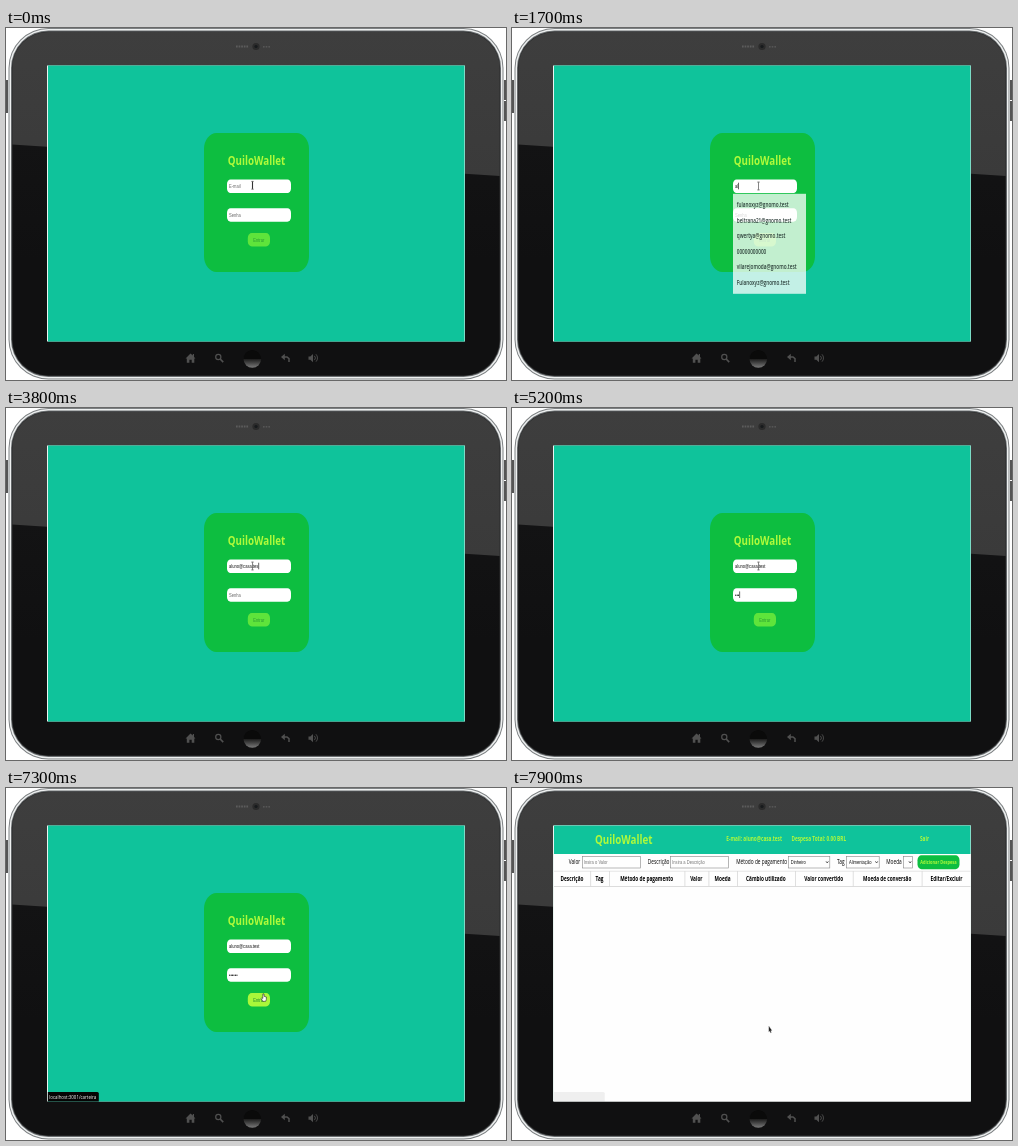
An HTML page with a canvas that plays this animation: 500x352 px, repeating every 8000 ms.

```html
<!DOCTYPE html>
<html lang="pt">
<head>
<meta charset="utf-8">
<title>Wallet login</title>
<style>
  html, body { margin: 0; width: 100%; height: 100%; overflow: hidden; background: #fff; }
  canvas { display: block; width: 500px; height: 352px; }
</style>
</head>
<body>
<canvas id="stage"></canvas>
<script>
const LOOP = 8000, STEP = 100;
const SX = 0.306, SY = 0.4; // size of one page pixel on the tablet screen
const UI = '"Open Sans", "Noto Sans", sans-serif';
const FIELD = '"Liberation Sans", Arial, sans-serif';
const TEAL = '#0fc39b', GREEN = '#0dbe40', LIME = '#b0fa3a';
const EMAIL = 'aluno@casa.test';
const SUGGESTIONS = [
  'fulanoxyz@gnomo.test', 'beltrana21@gnomo.test', 'qwertya@gnomo.test',
  '00000000000', 'vilarejomoda@gnomo.test', 'Fulanoxyz@gnomo.test'
];
// [time, characters typed]
const EMAIL_KEYS = [[1700, 2], [1900, 3], [2200, 5], [2400, 6], [2800, 7], [2900, 8],
  [3100, 10], [3300, 11], [3500, 12], [3700, 13], [3800, 14], [4000, 15]];
const PASS_KEYS = [[4900, 1], [5000, 2], [5200, 3], [5400, 4], [5600, 5], [5700, 6]];

const canvas = document.getElementById('stage');
const ctx = canvas.getContext('2d');
const dpr = window.devicePixelRatio || 1;
canvas.width = 500 * dpr;
canvas.height = 352 * dpr;

const clamp = v => Math.max(0, Math.min(1, v));
const ease = p => p * p * (3 - 2 * p);
const within = (t, a, b) => t >= a && t < b;
const typed = (keys, t) => keys.reduce((n, [at, count]) => t >= at ? count : n, 0);

function rect(x, y, w, h, color) {
  ctx.fillStyle = color;
  ctx.fillRect(x, y, w, h);
}

function round(x, y, w, h, rx, ry, color) {
  ctx.beginPath();
  ctx.roundRect(x, y, w, h, { x: rx, y: ry });
  ctx.fillStyle = color;
  ctx.fill();
}

function path(points, fill, stroke, width = 1) {
  ctx.beginPath();
  points.forEach(([x, y]) => ctx.lineTo(x, y));
  if (fill) {
    ctx.closePath();
    ctx.fillStyle = fill;
    ctx.fill();
  }
  if (stroke) {
    ctx.strokeStyle = stroke;
    ctx.lineWidth = width;
    ctx.stroke();
  }
}

function arc(x, y, r, a, b, color, width) {
  ctx.beginPath();
  ctx.arc(x, y, r, a, b);
  ctx.strokeStyle = color;
  ctx.lineWidth = width;
  ctx.stroke();
}

function disc(x, y, r, color) {
  ctx.beginPath();
  ctx.arc(x, y, r, 0, Math.PI * 2);
  ctx.fillStyle = color;
  ctx.fill();
}

function text(str, x, y, size, color, { weight = 400, font = UI, align = 'left' } = {}) {
  ctx.save();
  ctx.translate(x, y);
  ctx.scale(SX, SY);
  ctx.font = `${weight} ${size}px ${font}`;
  ctx.textAlign = align;
  ctx.fillStyle = color;
  ctx.fillText(str, 0, 0);
  const width = ctx.measureText(str).width * SX;
  ctx.restore();
  return width;
}

function gradient(y0, y1, ...colors) {
  const g = ctx.createLinearGradient(0, y0, 0, y1);
  colors.forEach((c, i) => g.addColorStop(i / (colors.length - 1), c));
  return g;
}

function drawTablet() {
  rect(0, 0, 500, 352, '#fff');
  rect(0, 52, 2, 33, '#555');
  rect(498, 52, 2, 20, '#555');
  rect(498, 73, 2, 20, '#555');
  // nested rims, from the outer edge inwards
  [[0, '#7d8183'], [1, '#eef0f0'], [2.5, '#6a6e70'], [3.4, '#262728']].forEach(([inset, color]) => {
    const r = 40 - inset;
    round(2.5 + inset, inset, 495 - 2 * inset, 351.5 - 2 * inset, r, r, color);
  });

  ctx.save();
  ctx.beginPath();
  ctx.roundRect(6.4, 3.9, 487.2, 343.7, 36);
  ctx.clip();
  rect(0, 0, 500, 352, gradient(0, 150, '#3e3e3e', '#3a3a3a'));
  path([[0, 116], [500, 148.5], [500, 352], [0, 352]], gradient(115, 350, '#131314', '#101011', '#101011'));
  ctx.restore();

  disc(250, 18.5, 3.6, '#2b2b2b');
  disc(250, 18.5, 1.6, '#171a1c');
  for (let i = 0; i < 5; i++) rect(230 + i * 2.6, 17.5, 1.7, 2, '#5c5c5c');
  for (let i = 0; i < 3; i++) rect(257 + i * 2.7, 18, 1.6, 1.6, '#565656');
  drawNavIcons('#505050');
  rect(41, 37.5, 418, 276, '#e9f4f0');
}

function drawNavIcons(c) {
  path([[179.5, 330.5], [184.5, 325.5], [186.8, 327.6], [186.8, 326], [188, 326], [188, 329],
    [189.5, 330.5], [188.3, 330.5], [188.3, 334.8], [185.7, 334.8], [185.7, 331.8],
    [183.4, 331.8], [183.4, 334.8], [180.8, 334.8], [180.8, 330.5]], c);

  arc(212.3, 329, 2.6, 0, 7, c, 1.2);
  path([[214.2, 331], [217.2, 334.2]], null, c, 1.7);

  disc(246.3, 331, 8.8, gradient(322, 340, '#060606', '#1b1b1b', '#7c7c7c'));
  ctx.beginPath();
  ctx.arc(246.3, 331, 8.8, Math.PI, 0);
  ctx.fillStyle = '#0a0a0a';
  ctx.fill();

  path([[275, 329], [278.8, 325.8], [278.8, 332.2]], c);
  path([[278, 329], [281, 329], [283, 330.6], [283, 334]], null, c, 1.5);

  path([[302.5, 328.4], [304.3, 328.4], [307, 326], [307, 334.2], [304.3, 331.8], [302.5, 331.8]], c);
  arc(306.3, 330, 3, -0.8, 0.8, c, 0.9);
  arc(306.3, 330, 5.2, -0.8, 0.8, c, 0.9);
}

function drawCaret(x, y) {
  rect(x, y, 0.6, 6.6, '#000');
}

function drawField(y, value, hint, caret) {
  round(221, y, 64, 13.5, 3.6, 4.6, '#fff');
  const base = y + 8.5;
  let width = 0;
  if (value) width = text(value, 223, base, 13.33, '#111', { font: FIELD });
  else text(hint, 223, base, 13.33, '#666', { font: FIELD });
  if (caret) drawCaret(223 + width + 0.2, y + 3.2);
}

function drawSuggestions(alpha) {
  if (!alpha) return;
  ctx.save();
  ctx.globalAlpha = alpha;
  rect(221, 165.8, 73, 100, '#fff');
  ctx.globalAlpha = Math.min(1, alpha * 1.2);
  SUGGESTIONS.forEach((s, i) => text(s, 224.7, 179.2 + i * 15.55, 15.4, '#1b2b28', { weight: 600 }));
  ctx.restore();
}

function drawLogin(t) {
  rect(42, 37.5, 416.5, 276, TEAL);
  round(198, 105, 105, 139, 12.5, 16, GREEN);
  text('QuiloWallet', 250.5, 136.6, 32, LIME, { weight: 700, align: 'center' });

  const passCaret = within(t, 4400, 6300) || within(t, 7100, 7300);
  drawField(151.5, EMAIL.slice(0, typed(EMAIL_KEYS, t)), 'E-mail', within(t, 700, 1400) || within(t, 1700, 4400));
  drawField(180.2, '•'.repeat(typed(PASS_KEYS, t)), 'Senha', passCaret);

  const ready = t >= 5700;
  round(241.8, 205, 22.2, 13.4, 4, 5, ready ? '#a9f73a' : '#5fe43b');
  text('Entrar', 252.8, 213.5, 13.33, ready ? '#17852f' : '#279a33', { font: FIELD, align: 'center' });

  const fade = within(t, 700, 1700) ? 1 : t === 1700 ? 0.75 : t === 1800 ? 0.35 : 0;
  drawSuggestions(fade);
}

function drawBox(x, w, label, isSelect) {
  ctx.strokeStyle = '#858585';
  ctx.lineWidth = 0.6;
  ctx.strokeRect(x, 68.3, w, 11.7);
  text(label, x + (isSelect ? 2.4 : 1.6), 76, 13.33, isSelect ? '#111' : '#757575', { font: FIELD });
  if (isSelect) path([[x + w - 3.8, 73.3], [x + w - 2.6, 75], [x + w - 1.4, 73.3]], null, '#222', 0.7);
}

function drawWallet() {
  const bold = { weight: 700 };
  const mid = { weight: 700, align: 'center' };
  rect(42, 37.5, 416.5, 276, '#fefefe');
  rect(42, 37.5, 416.5, 28.5, TEAL);
  text('QuiloWallet', 83, 55.7, 32, LIME, bold);
  text('E-mail: ' + EMAIL, 214.3, 53.3, 15.4, LIME, bold);
  text('Despesa Total: 0.00 BRL', 279.5, 53.3, 15.4, LIME, bold);
  text('Sair', 408, 53.3, 15.4, LIME, bold);

  [['Valor', 56.8], ['Descrição', 135.8], ['Método de pagamento', 224.3], ['Tag', 325], ['Moeda', 374.3]]
    .forEach(([s, x]) => text(s, x, 76.2, 15.6, '#000', { weight: 500 }));
  drawBox(70.3, 58, 'Insira o Valor');
  drawBox(158.6, 58, 'Insira a Descrição');
  drawBox(276.3, 41.5, 'Dinheiro', true);
  drawBox(334.6, 32.6, 'Alimentação', true);
  drawBox(391.3, 9.4, '', true);
  round(405.5, 67.3, 42, 14, 4, 5, GREEN);
  text('Adicionar Despesa', 426.5, 76.3, 12.9, LIME, mid);

  const edges = [78.3, 97, 172.5, 196.5, 225, 283.2, 340.8, 409.7];
  rect(42, 82.8, 416.5, 0.7, '#dcdcdc');
  rect(42, 98, 416.5, 0.8, '#d4d4d4');
  edges.forEach(x => rect(x, 83, 0.8, 15.5, '#d8d8d8'));
  [['Descrição', 60], ['Tag', 87.5], ['Método de pagamento', 134.7], ['Valor', 184.3],
    ['Moeda', 210.6], ['Câmbio utilizado', 253.8], ['Valor convertido', 311.8],
    ['Moeda de conversão', 375.2], ['Editar/Excluir', 434.5]]
    .forEach(([s, x]) => text(s, x, 93.4, 15.4, '#000', mid));
}

function drawStatus(t) {
  const alpha = t < 6900 ? 0 : t < 7100 ? 0.6 : t < 7800 ? 1 : t < 7900 ? 0.5 : 0.06;
  if (!alpha) return;
  ctx.save();
  ctx.globalAlpha = alpha;
  ctx.beginPath();
  ctx.roundRect(41.8, 304, 51, 9.5, [0, 1.5, 0, 0]);
  ctx.fillStyle = '#050505';
  ctx.fill();
  text('localhost:3001/carteira', 43.2, 310.6, 14.4, '#fff');
  ctx.restore();
}

function drawBeam(x, y, width) {
  const c = '#333';
  path([[x, y - 3.6], [x, y + 3.6]], null, c, width);
  path([[x - 1.1, y - 3.9], [x + 1.1, y - 3.9]], null, c, 0.7);
  path([[x - 1.1, y + 3.9], [x + 1.1, y + 3.9]], null, c, 0.7);
}

function drawArrow(x, y) {
  path([[x, y], [x, y + 6], [x + 1, y + 5.1], [x + 1.8, y + 7], [x + 2.6, y + 6.6],
    [x + 1.9, y + 4.7], [x + 3.2, y + 4.6]], '#161616', '#bbb', 0.3);
}

function drawHand(x, y) {
  path([[x - 0.6, y - 1.6], [x + 0.5, y - 1.6], [x + 0.6, y + 0.8], [x + 2.9, y + 1.5],
    [x + 2.8, y + 4], [x + 2.2, y + 5.8], [x - 0.8, y + 5.8], [x - 2.3, y + 2.8],
    [x - 1.7, y + 2.2], [x - 0.7, y + 3]], '#fff', '#222', 0.6);
}

function drawPointer(t) {
  if (t >= 7500) {
    drawArrow(256.8, 206 + 32 * clamp((t - 7700) / 200));
    return;
  }
  const p = ease(clamp((t - 6200) / 700));
  const x = 246.5 + 11 * p;
  const y = 158 + 49.5 * p;
  if (t < 200) drawBeam(x, y - 0.7, 1.1);
  else if (within(y, 151, 165) || within(y, 180, 194)) drawBeam(x, y, 0.6);
  else if (y >= 205) drawHand(x, y);
  else drawArrow(x, y);
}

function draw(now) {
  const t = Math.floor((now % LOOP) / STEP) * STEP;
  ctx.setTransform(dpr, 0, 0, dpr, 0, 0);
  drawTablet();
  if (t < 7500) drawLogin(t);
  else drawWallet();
  drawStatus(t);
  drawPointer(t);
}

const start = performance.now();
function tick() {
  draw(performance.now() - start);
  requestAnimationFrame(tick);
}
tick();
</script>
</body>
</html>
```
